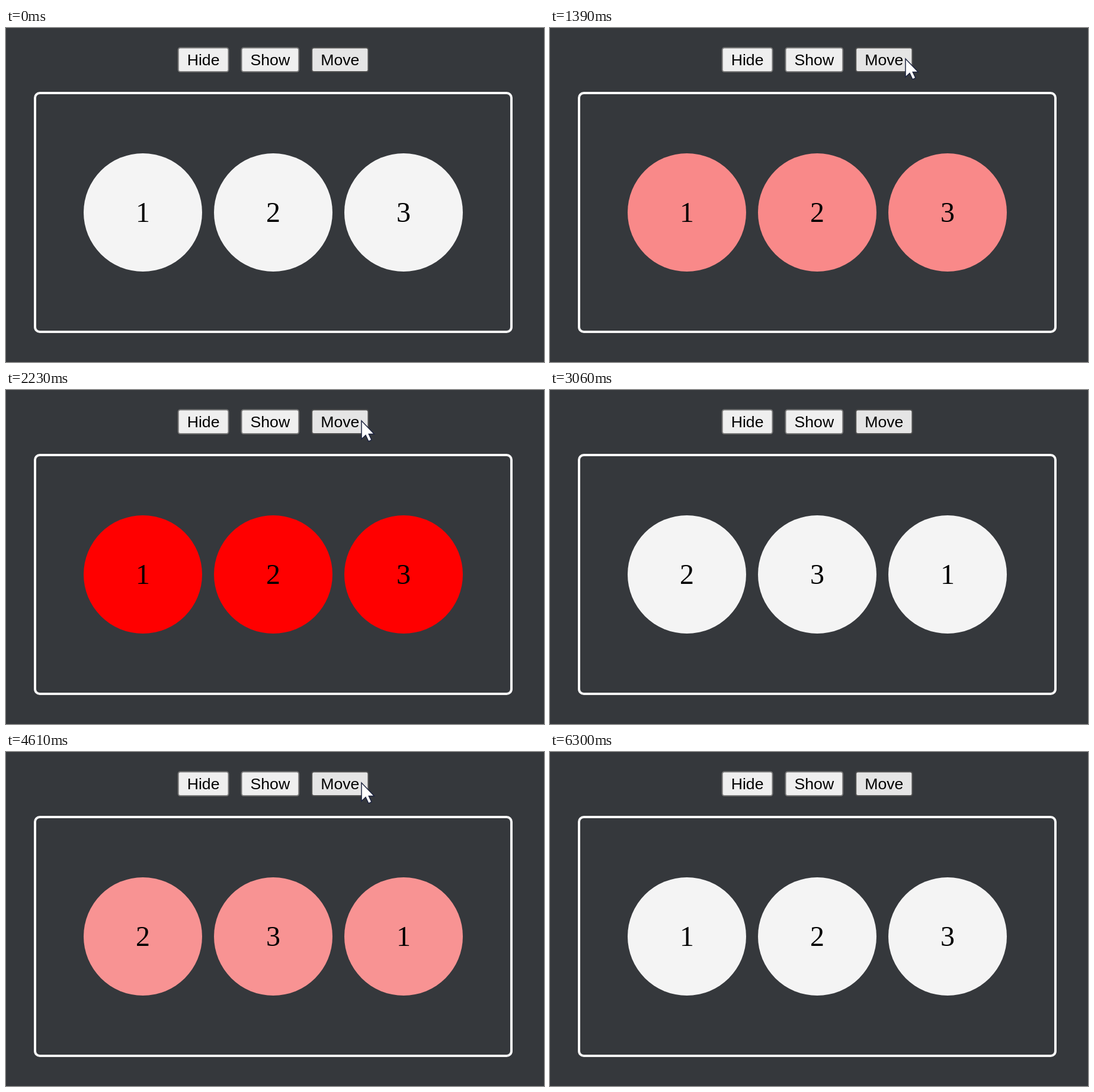
An HTML page that plays this animation: 908 px wide and 565 px high, repeating every 6870 ms.

```html
<!DOCTYPE html>
<html lang="en">
<head>
<meta charset="utf-8">
<title>Hide, show, move</title>
<style>
  html, body { margin: 0; width: 100%; height: 100%; overflow: hidden; background: #35383c; }
  svg { display: block; width: 908px; height: 565px; }
  #buttons { font: 26.667px "Liberation Sans", Arial, sans-serif; }
  #buttons rect { fill: #efefef; stroke: #767676; stroke-width: 2; }
  #buttons .hover { fill: #e5e5e5; stroke: #4f4f4f; }
  #buttons .active { fill: #f5f5f5; stroke: #8d8d8d; }
  #balls { font: 48px "Liberation Serif", "Times New Roman", serif; text-anchor: middle; }
</style>
</head>
<body>
<svg viewBox="0 0 908 565">
  <g id="buttons">
    <rect x="290.7" y="33.5" width="84.8" height="40.5" rx="3.5"/><text x="305.7" y="63">Hide</text>
    <rect x="397.5" y="33.5" width="96.7" height="40.5" rx="3.5"/><text x="412.5" y="63">Show</text>
    <rect id="move" x="516.2" y="33.5" width="95.2" height="40.5" rx="3.5"/><text x="531.2" y="63">Move</text>
  </g>
  <rect x="49" y="110" width="804" height="404" rx="8" fill="none" stroke="#f8f8f8" stroke-width="4"/>
  <g id="balls">
    <g id="discs"><circle cx="231" cy="312" r="100"/><circle cx="451" cy="312" r="100"/><circle cx="671" cy="312" r="100"/></g>
    <text x="231" y="328"></text><text x="451" y="328"></text><text x="671" y="328"></text>
  </g>
  <path id="cursor" d="M600 52V83L607 76.5L612 87L617 84.5L612.3 74.5H621.5Z" fill="#fff" stroke="#1d2440" stroke-width="1.5"/>
</svg>
<script>
  const LOOP = 6870, FADE = 1000, TICK = 230 / 3;
  const clicks = [
    { press: 990, fade: 1127, release: 1160, swap: 2570, leave: 3060 },
    { press: 4220, fade: 4365, release: 4390, swap: 5800, leave: 6300 },
  ];
  const [move, discs, cursor] = ["move", "discs", "cursor"].map(id => document.getElementById(id));
  const labels = document.querySelectorAll("#balls text");
  const within = (t, from, to) => t >= from && t < to;

  // cubic-bezier(.25, .1, .25, 1), solved for x by bisection
  function ease(x) {
    if (x <= 0) return 0;
    if (x >= 1) return 1;
    const bezier = (a, b, u) => 3 * a * u * (1 - u) ** 2 + 3 * b * u * u * (1 - u) + u ** 3;
    let low = 0, high = 1;
    for (let i = 0; i < 25; i++) {
      const mid = (low + high) / 2;
      if (bezier(.25, .25, mid) < x) low = mid; else high = mid;
    }
    return bezier(.1, 1, low);
  }

  function draw(t) {
    const ticked = Math.floor((t - 9) / TICK) * TICK + 10; // the fade advances in visible steps
    const fading = clicks.find(c => within(t, c.fade, c.swap));
    const red = fading ? ease((ticked - fading.fade) / FADE) : 0;
    const rest = Math.round(244 * (1 - red));
    discs.setAttribute("fill", `rgb(${Math.round(244 + 11 * red)},${rest},${rest})`);

    const order = within(t, clicks[0].swap, clicks[1].swap) ? "231" : "123";
    labels.forEach((label, i) => label.textContent = order[i]);

    move.setAttribute("class", clicks.some(c => within(t, c.press, c.release)) ? "active" : "hover");
    cursor.style.display = clicks.some(c => within(t, c.press, c.leave)) ? "" : "none";
  }

  const start = performance.now();
  function frame() {
    draw((performance.now() - start) % LOOP);
    requestAnimationFrame(frame);
  }
  frame();
</script>
</body>
</html>
```
